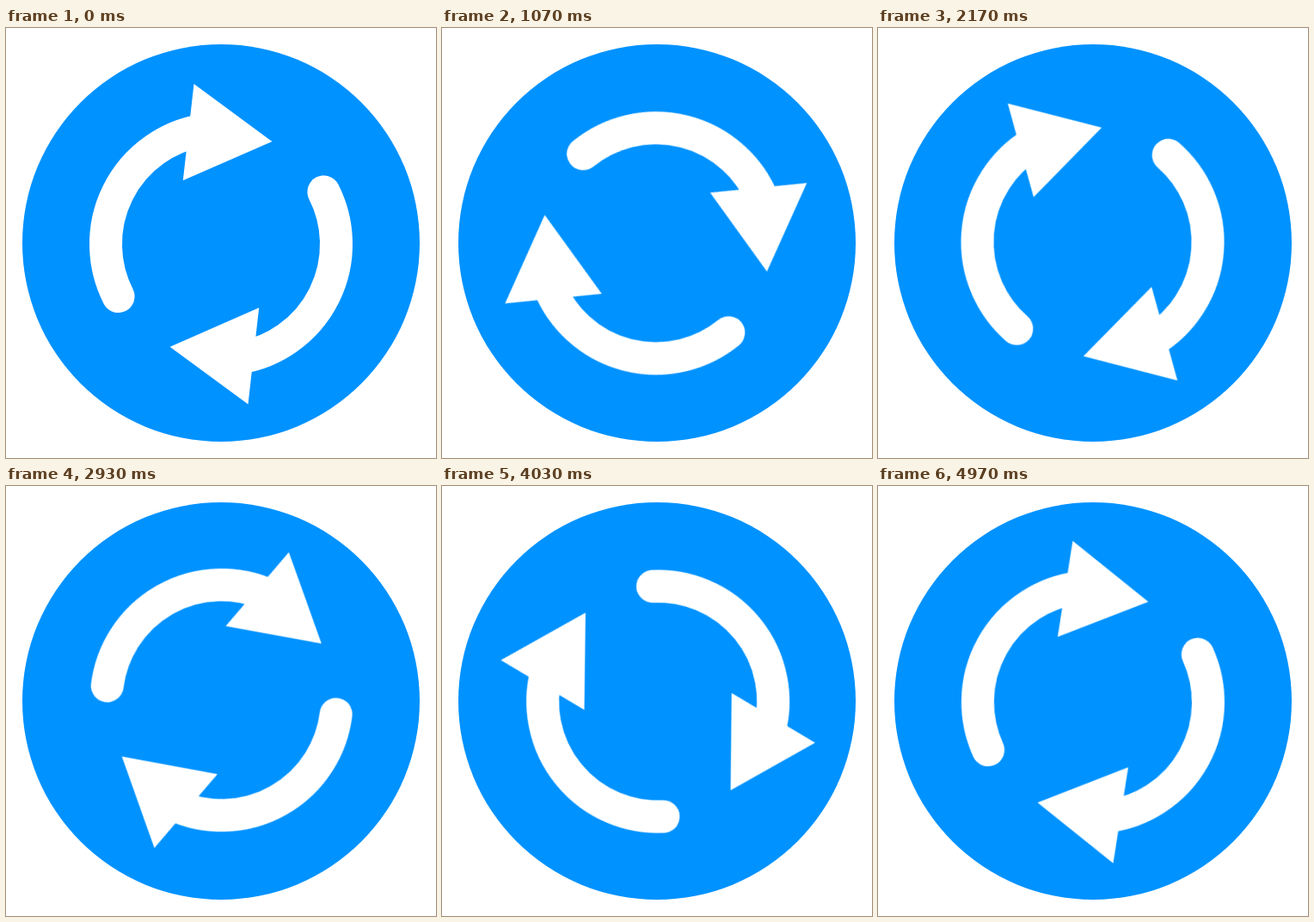
Write an HTML page without scripts that moves like this. It is 500x500 px and loops after 5.01 s.

```html
<!DOCTYPE html>
<html lang="en">
<head>
<meta charset="utf-8">
<title>Refresh</title>
<style>
  html, body { margin: 0; width: 100%; height: 100%; overflow: hidden; background: #fff; }
  svg { display: block; width: 100%; height: 100%; }
  .disc { fill: #0092ff; }
  .shaft { fill: none; stroke: #fff; stroke-width: 38; stroke-linecap: round; }
  .head { fill: #fff; }

  /* 148 ticks make one turn; the loop runs 149 ticks, then rests briefly */
  .spin {
    --tick: calc(360deg / 148);
    transform-origin: 0 0;
    animation: spin 5010ms -3.4ms infinite;
  }
  @keyframes spin {
    0% { transform: rotate(0deg); animation-timing-function: steps(149, end); }
    99.1351%, 100% { transform: rotate(calc(149 * var(--tick))); }
  }
</style>
</head>
<body>
<svg viewBox="-250 -250 500 500">
  <defs>
    <g id="arrow">
      <path class="shaft" d="M-119.4 60.8A134 134 0 0 1-23.3-132"/>
      <path class="head" d="M-31.5-186.2L59.4-119.4L-44.2-74Z"/>
    </g>
  </defs>
  <circle class="disc" r="231"/>
  <g class="spin">
    <!-- the pair sits slightly off the pivot -->
    <g transform="translate(0 1.3)">
      <use href="#arrow"/>
      <use href="#arrow" transform="rotate(180)"/>
    </g>
  </g>
</svg>
</body>
</html>
```
